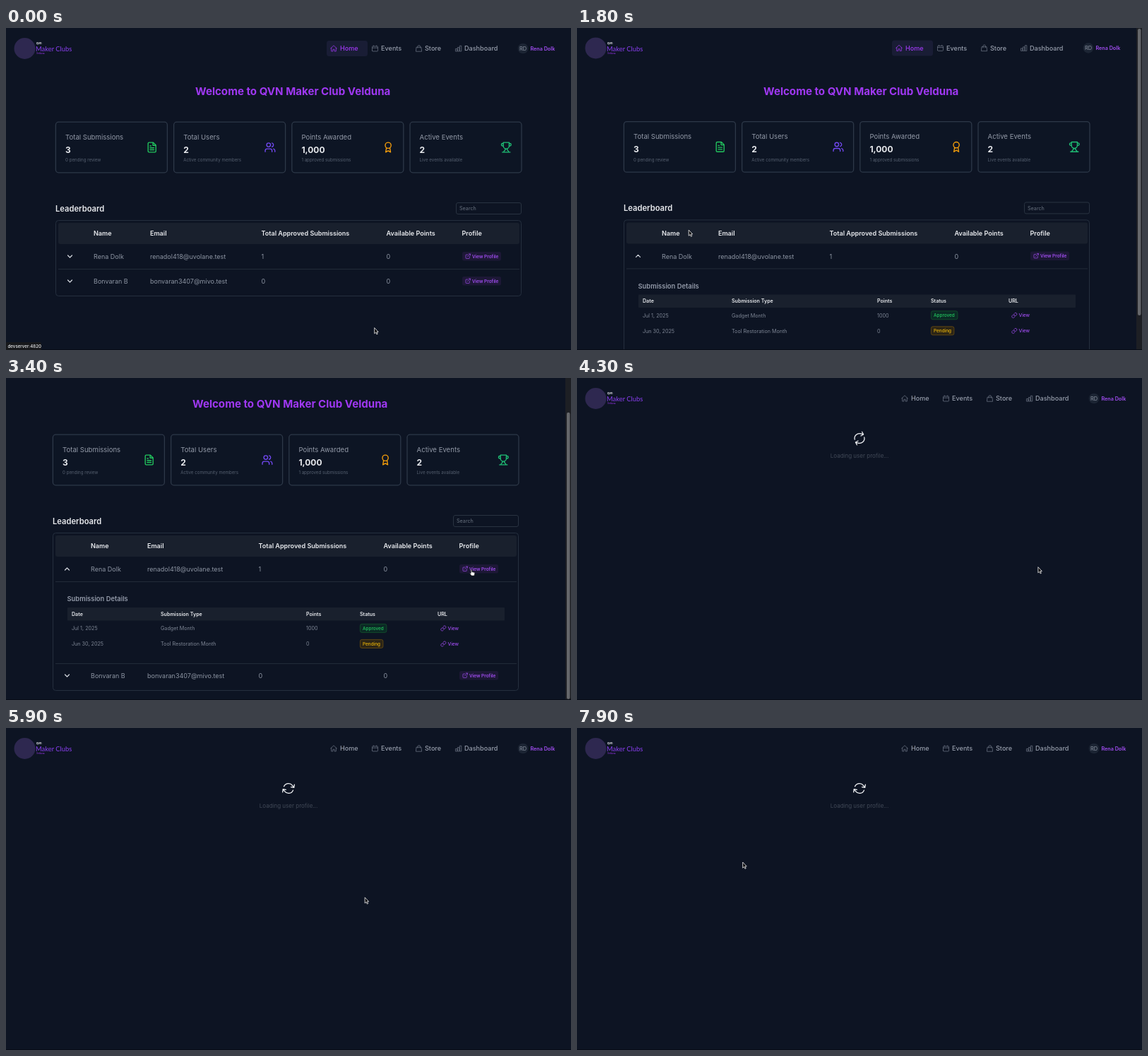
An HTML page that plays this animation: 800 by 456 pixels, repeating every 8000 ms.

```html
<!DOCTYPE html>
<html lang="en">
<head>
<meta charset="utf-8">
<title>Community dashboard</title>
<style>
html, body { margin: 0; width: 100%; height: 100%; overflow: hidden; background: #0d1423; }
svg { display: block; width: 100vw; height: 100vh; font-family: Inter, sans-serif; }
.icon { fill: none; stroke-linecap: round; stroke-linejoin: round; }
</style>
</head>
<body>
<svg id="stage" viewBox="0 0 800 456"></svg>
<script>
const LOOP = 8000, EXPAND = 1300, SCROLL_FROM = 1900, SCROLL_TO = 2100, LOAD = 3880, STATUS_END = 500;
const SCROLL = 52.4, DETAIL_HEIGHT = 116;
const BACK = '#0d1423', PURPLE = '#9f38f2', LILAC = '#a04df0', GREY = '#8d95a3', DIM = '#566070', WHITE = '#e8eaee', GREEN = '#22c55e';

// Text whose capitals are centred on y.
const text = (x, y, size, fill, str, weight = 400, extra = '') =>
  `<text x="${x}" y="${(y + size * 0.363).toFixed(2)}" font-size="${size}" font-weight="${weight}" fill="${fill}" ${extra}>${str}</text>`;
const rect = (x, y, w, h, r, fill, stroke = 'none', sw = 1) =>
  `<rect x="${x}" y="${y}" width="${w}" height="${h}" rx="${r}" fill="${fill}" stroke="${stroke}" stroke-width="${sw}"/>`;
const line = (x1, x2, y, color) => `<path d="M${x1} ${y}H${x2}" stroke="${color}"/>`;
const group = (id, inner) => `<g id="${id}">${inner}</g>`;

// Icons live on a 24-unit grid and are placed by their centre.
const circle = (x, y, r) => `M${x - r} ${y}a${r} ${r} 0 1 0 ${2 * r} 0a${r} ${r} 0 1 0 ${-2 * r} 0`;
const icons = {
  home: 'M2 12 12 2.5 22 12M4.5 10v11h5v-6h5v6h5V10',
  calendar: 'M7 2.5V5M17 2.5V5M3 19V7a2 2 0 0 1 2-2h14a2 2 0 0 1 2 2v12a2 2 0 0 1-2 2H5a2 2 0 0 1-2-2ZM3 10h18',
  bag: 'M16 10V6a4 4 0 0 0-8 0v4M4.5 8h15l1.3 13.5H3.2Z',
  chart: 'M3 13h4.5v8H3ZM9.7 8.5h4.5V21H9.7ZM16.5 3.5H21V21h-4.5Z',
  file: 'M14.5 2H6a2 2 0 0 0-2 2v16a2 2 0 0 0 2 2h12a2 2 0 0 0 2-2V7.5ZM14 2v6h6M16 13H8M16 17H8M10 9H8',
  users: 'M16 21v-2a4 4 0 0 0-4-4H6a4 4 0 0 0-4 4v2M22 21v-2a4 4 0 0 0-3-3.87M16 3.13a4 4 0 0 1 0 7.75' + circle(9, 7, 4),
  award: 'M15.5 12.9 17 22l-5-3-5 3 1.5-9.1' + circle(12, 8, 6),
  trophy: 'M6 9H4.5a2.5 2.5 0 0 1 0-5H6M18 9h1.5a2.5 2.5 0 0 0 0-5H18M4 22h16M10 14.7V17c0 .6-.5 1-1 1.2C7.9 18.8 7 20.2 7 22M14 14.7V17c0 .6.5 1 1 1.2 1.1.6 2 2 2 3.8M18 2H6v7a6 6 0 0 0 12 0Z',
  open: 'M18 13v6a2 2 0 0 1-2 2H5a2 2 0 0 1-2-2V8a2 2 0 0 1 2-2h6M15 3h6v6M10 14 21 3',
  link: 'M10 13a5 5 0 0 0 7.5.5l3-3a5 5 0 0 0-7-7l-1.7 1.7M14 11a5 5 0 0 0-7.5-.5l-3 3a5 5 0 0 0 7 7l1.7-1.7',
  refresh: 'M16 9.35h5M3 19.64v-5h5m-5 0 3.2 3.2a8.25 8.25 0 0 0 13.8-3.7M4 9.87a8.25 8.25 0 0 1 13.8-3.7L21 9.35m0-5v5'
};
const icon = (name, x, y, size, color, sw = 2, id = '') =>
  `<g transform="translate(${x} ${y})"><g id="${id || name + x}"><path class="icon" d="${icons[name]}" stroke="${color}" stroke-width="${sw}" transform="scale(${size / 24}) translate(-12 -12)"/></g></g>`;

function logo() {
  return '<circle cx="26.5" cy="29" r="15" fill="#2e2850"/>' +
    text(43, 21.8, 4, WHITE, 'qvn', 700) +
    text(42, 30, 9.4, '#8a3ff0', 'Maker Clubs', 400, 'font-family="Lato, sans-serif"') +
    text(43, 36.3, 3, PURPLE, 'Velduna');
}

function nav() {
  const items = [['home', 464, 473, 'Home'], ['calendar', 522.5, 531, 'Events'], ['bag', 584.7, 593, 'Store'], ['chart', 640.8, 649, 'Dashboard']];
  const item = ([name, x, tx, label], on) =>
    icon(name, x, 29, 10.6, on ? PURPLE : '#6b7383', 1.7) + text(tx, 29, 9.1, on ? PURPLE : '#969dab', label, 500);
  return group('homeOn', rect(454, 18, 58, 22, 3.5, '#191d35') + item(items[0], true)) +
    group('homeOff', item(items[0], false)) +
    items.slice(1).map(i => item(i, false)).join('') +
    '<circle cx="732" cy="29" r="7.3" fill="#1c2534"/>' +
    text(732, 29, 7.4, '#8d95a3', 'RD', 400, 'text-anchor="middle"') +
    text(742.5, 29, 7.2, LILAC, 'Rena Dolk', 600);
}

function cards() {
  return [
    ['Total Submissions', '3', '0 pending review', 'file', GREEN],
    ['Total Users', '2', 'Active community members', 'users', '#7148f0'],
    ['Points Awarded', '1,000', '1 approved submissions', 'award', '#f59e0b'],
    ['Active Events', '2', 'Live events available', 'trophy', '#1fbf75']
  ].map(([label, value, note, name, color], i) => {
    const x = 70 + i * 167.2;
    return rect(x + 0.4, 133.2, 158, 71.6, 4, '#0d1524', '#2d3848', 1.3) +
      text(x + 14, 154.3, 9.6, '#9299a7', label) +
      text(x + 14, 172.3, 12, WHITE, value, 700) +
      text(x + 14, 187.2, 6.2, DIM, note) +
      icon(name, x + 136.7, 169, 16.5, color);
  }).join('');
}

const columns = [124, 204, 361.5, 538.5, 645.5];

function row(y, name, mail, count, id) {
  return `<path id="${id}" class="icon" d="M-3-1.5 0 1.5 3-1.5" stroke="#d5d9e0" stroke-width="1.2" transform="translate(90.5 ${y - 0.5})"/>` +
    [name, mail, count, '0'].map((s, i) => text(columns[i], y, 9, GREY, s)).join('') +
    rect(646, y - 7, 55, 12.5, 2.5, '#1d1836') +
    icon('open', 654.2, y - 0.8, 8.6, LILAC) + text(660, y - 0.7, 6.45, LILAC, 'View Profile', 600);
}

function badge(y, w, label, fill, stroke, color) {
  return rect(505.4, y - 6.1, w, 12, 2.5, fill, stroke, 0.8) + text(509, y, 6.4, color, label, 500);
}

function details() {
  const xs = [97, 223, 429, 505, 615];
  const entry = (y, date, type, points) =>
    [date, type, points].map((s, i) => text(xs[i], y, 7.2, '#7e8695', s)).join('') +
    icon('link', 623.3, y, 9, LILAC) + text(629.5, y, 6.6, LILAC, 'View', 500);
  return text(90.5, 366, 9.4, '#949baa', 'Submission Details', 600) +
    rect(91, 378, 619, 18.5, 1, '#19202d') +
    ['Date', 'Submission Type', 'Points', 'Status', 'URL'].map((s, i) => text(xs[i], 387.2, 7.1, WHITE, s, 600)).join('') +
    entry(407.5, 'Jul 1, 2025', 'Gadget Month', '1000') + badge(407.5, 37.5, 'Approved', '#0b2a25', '#14532d', GREEN) +
    entry(429.5, 'Jun 30, 2025', 'Tool Restoration Month', '0') + badge(429.5, 32.5, 'Pending', '#2c2516', '#6b4e12', '#eab308');
}

function board() {
  return text(268, 90, 15.1, PURPLE, 'Welcome to QVN Maker Club Velduna', 700) + cards() +
    text(70, 256, 11.2, WHITE, 'Leaderboard', 600) +
    rect(637.5, 247.5, 92, 16, 2.5, BACK, '#293341') + text(642, 255.7, 7.2, '#68717f', 'Search') +
    '<rect id="frame" x="70.5" y="272.5" width="659" rx="4" fill="none" stroke="#252f3e"/>' +
    rect(74, 276, 653, 30, 3, '#19202d') +
    ['Name', 'Email', 'Total Approved Submissions', 'Available Points', 'Profile'].map((s, i) => text(columns[i], 291, 9.05, WHITE, s, 600)).join('') +
    row(324, 'Rena Dolk', 'renadol418@uvolane.test', '1', 'toggle') + line(74, 727, 341.5, '#222b39') +
    group('details', details()) +
    group('lastRow', line(74, 727, 341.5, '#222b39') + row(359, 'Bonvaran B', 'bonvaran3407@mivo.test', '0', 'toggle2'));
}

const $ = id => document.getElementById(id);
$('stage').innerHTML = rect(0, 0, 800, 456, 0, BACK) +
  group('page', logo() + group('nav', nav()) + group('board', board())) +
  group('loading', icon('refresh', 400, 85.5, 20.2, '#f1f3f6', 1.5, 'spinner') +
    text(400, 109.8, 8, '#414957', 'Loading user profile...', 400, 'text-anchor="middle"')) +
  group('scrollbar', rect(792, 0, 8, 456, 0, '#1d1f24') + group('thumb', rect(794, 1, 4.5, 406, 2.2, '#65676b'))) +
  line(0, 800, 455.5, '#080c16') +
  group('status', rect(-3, 445, 53, 14, 2, '#17181b') + text(2.5, 450.5, 6.2, WHITE, 'devserver:4820', 500)) +
  group('cursor',
    '<path id="arrow" d="M-.3 0V8.2L1.6 6.5 2.9 9.3 4.2 8.7 2.9 5.9H5.2Z" fill="#0a0a0c" stroke="#f4f4f4" stroke-width=".8" stroke-linejoin="round"/>' +
    '<path id="hand" d="M.2.8Q1-.4 1.7.8V3.6L5 4.3Q6 4.6 5.8 5.8L5 9H1.2L-1.4 5.8Q-1.3 4.7.2 5.6Z" fill="#fafafa" stroke="#111" stroke-width=".6"/>');

// Pointer tip: time, x, y
const track = [[0, 522, 424.5], [100, 522, 424.5], [1000, 90, 322], [1350, 90, 322], [1750, 158.5, 286], [2350, 158.5, 286],
  [3200, 658, 271], [3900, 658, 271], [4500, 651.5, 266.5], [5300, 651.5, 266.5], [6600, 329, 206.5], [6700, 329, 206.5], [7300, 235, 190], [8000, 235, 190]];
const ease = p => p * p * (3 - 2 * p);
const clamp = p => Math.max(0, Math.min(1, p));

function pointer(t) {
  const i = track.findIndex(k => k[0] > t);
  const [t0, x0, y0] = track[i - 1], [t1, x1, y1] = track[i];
  const p = ease((t - t0) / (t1 - t0));
  return [x0 + (x1 - x0) * p, y0 + (y1 - y0) * p];
}

const show = (id, on) => $(id).setAttribute('display', on ? 'inline' : 'none');
const move = (id, x, y, more = '') => $(id).setAttribute('transform', `translate(${x} ${y}) ${more}`);

function draw(t) {
  const loading = t >= LOAD, open = t >= EXPAND && !loading;
  const scroll = open ? SCROLL * ease(clamp((t - SCROLL_FROM) / (SCROLL_TO - SCROLL_FROM))) : 0;
  move('page', 0, open ? -0.6 - scroll : 0);
  move('nav', open ? -8 : 0, 0);
  move('board', open ? -4 : 0, 0);
  move('lastRow', 0, open ? DETAIL_HEIGHT : 0);
  move('toggle', 90.5, 323.5, open ? 'scale(1 -1)' : '');
  $('frame').setAttribute('height', 107 + (open ? DETAIL_HEIGHT : 0));
  move('thumb', 0, scroll * 0.91);
  show('board', !loading);
  show('homeOn', !loading);
  show('homeOff', loading);
  show('loading', loading);
  show('details', open);
  show('scrollbar', open);
  show('status', t < STATUS_END);
  $('spinner').setAttribute('transform', `rotate(${(t - LOAD) * 0.36})`);

  const [x, y] = pointer(t);
  const onToggle = Math.abs(x - 90) < 8 && Math.abs(y - 323) < 8;
  const onProfile = !loading && x > 642 && y < 277;
  move('cursor', x, y);
  show('hand', onToggle || onProfile);
  show('arrow', !(onToggle || onProfile));
}

const start = performance.now();
function tick() {
  draw((performance.now() - start) % LOOP);
  requestAnimationFrame(tick);
}
tick();
</script>
</body>
</html>
```
